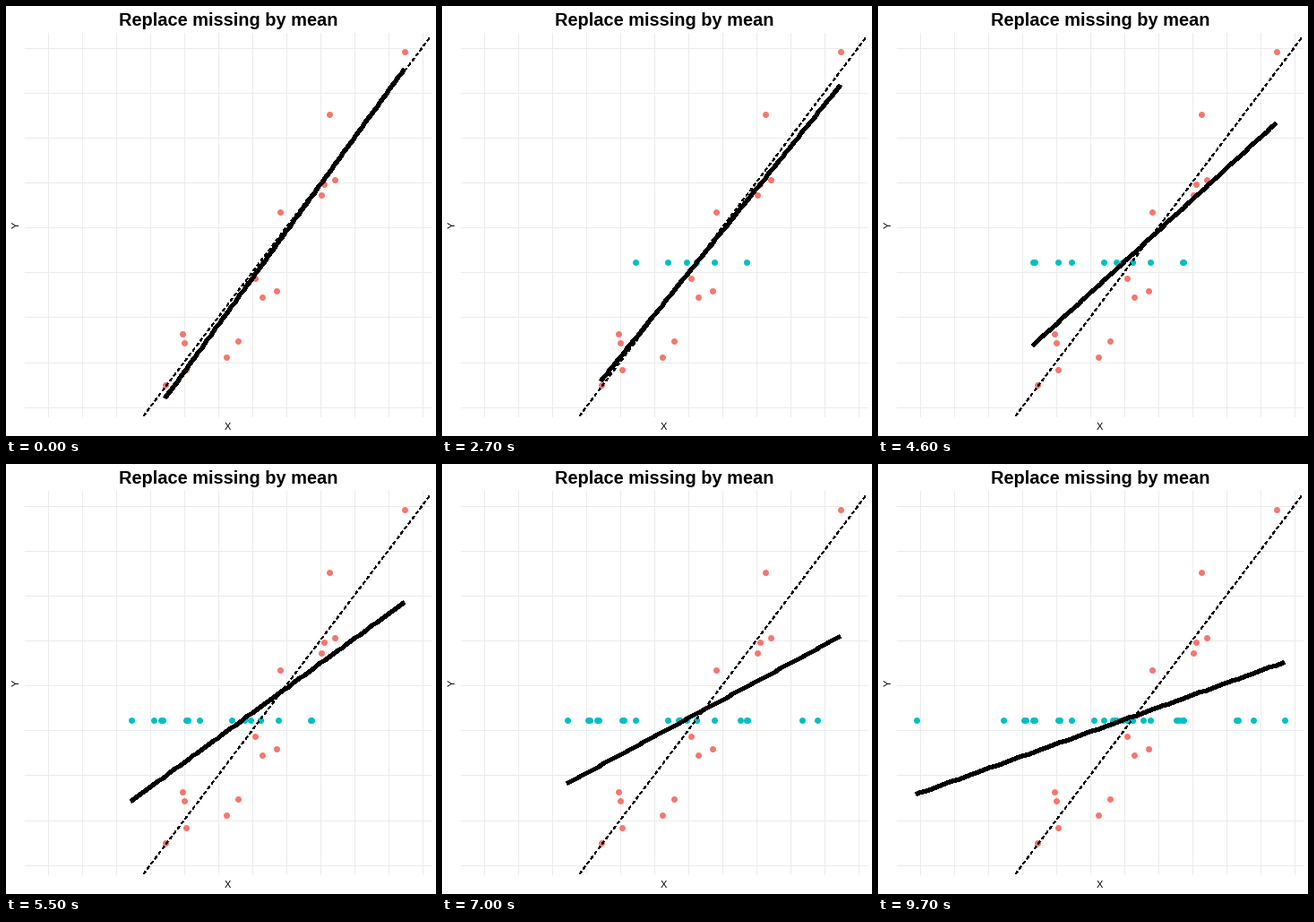
A matplotlib script that plays this animation: 480x480 px, repeating every 10000 ms.

```python
import numpy as np
import matplotlib.pyplot as plt
from matplotlib.animation import FuncAnimation

SIZE, DPI = 480, 100
PX = 72 / DPI  # points per pixel
RED, TEAL, GRID = "#F8766D", "#00BFC4", "#EBEBEB"
LEFT, RIGHT, TOP, BOTTOM = 21, 474, 30, 458

plt.rcParams["font.family"] = "Liberation Sans"
plt.rcParams["path.simplify"] = False

# Observed points, in stage pixels
obs_x = np.array([177, 196, 198, 200, 245, 258, 277, 285,
                  301, 305, 351, 354, 360, 366, 444]) + 0.5
obs_y = np.array([422, 365, 375, 405, 391, 373, 303, 324,
                  317, 229, 210, 198, 120, 193, 50]) + 0.5
# Imputed points, in order of appearance
imp_x = np.array([251, 283, 215, 272, 283, 303, 339, 200, 340, 265,
                  172, 174, 202, 139, 164, 332, 162, 418, 263, 401,
                  295, 399, 271, 335, 240, 42, 261, 453, 277]) + 0.5
mean_y = obs_y.mean()

fig = plt.figure(figsize=(SIZE / DPI, SIZE / DPI), dpi=DPI, facecolor="white")
ax = fig.add_axes([0, 0, 1, 1])
ax.set_xlim(0, SIZE)
ax.set_ylim(SIZE, 0)
ax.axis("off")


def dots(x, y, color):
    return ax.plot(x, y, "o", ms=7 * PX, mew=0, color=color,
                   antialiased=False, zorder=2)[0]


grid = dict(color=GRID, lw=PX, antialiased=False, zorder=1)
ax.vlines(46.5 + 38 * np.arange(12), TOP, BOTTOM, **grid)
ax.hlines(np.floor(46.3 + 50.1 * np.arange(9)) + 0.5, LEFT, RIGHT, **grid)

dots(obs_x, obs_y, RED)
imputed = dots([], [], TEAL)
ax.plot([153.5, 474.5], [457.5, 33.5], color="black", lw=PX,
        ls=(0, (4, 4)), antialiased=False, zorder=3)
fit, = ax.plot([], [], color="black", lw=4 * PX, antialiased=False,
               solid_capstyle="butt", solid_joinstyle="round",
               snap=False, zorder=4)

ax.text(248, 22, "Replace missing by mean", size=20 * PX, weight="bold",
        ha="center", va="baseline")
ax.text(247.5, 473, "X", size=11 * PX, ha="center", va="baseline")
ax.text(11.5, 244.5, "Y", size=11 * PX, rotation=90, ha="center", va="center")


def count_at(tick):
    """Imputed points shown: one per 400 ms at first, then one per 300 ms."""
    return (tick + 1) // 4 if tick < 43 else (tick - 10) // 3


def update(tick):
    new_x = imp_x[:count_at(tick)]
    new_y = np.full(len(new_x), mean_y)
    imputed.set_data(new_x, new_y)

    x = np.concatenate([obs_x, new_x])
    y = np.concatenate([obs_y, new_y])
    slope, icept = np.polyfit(x, y, 1)
    xs = np.linspace(x.min(), x.max(), 80)
    # whole-pixel vertices give the line its stepped edge
    fit.set_data(np.floor(xs) + 0.5, np.floor(icept + slope * xs) + 0.5)
    return imputed, fit


anim = FuncAnimation(fig, update, frames=100, interval=100,
                     repeat=True, repeat_delay=0, blit=False)
plt.show()
```
